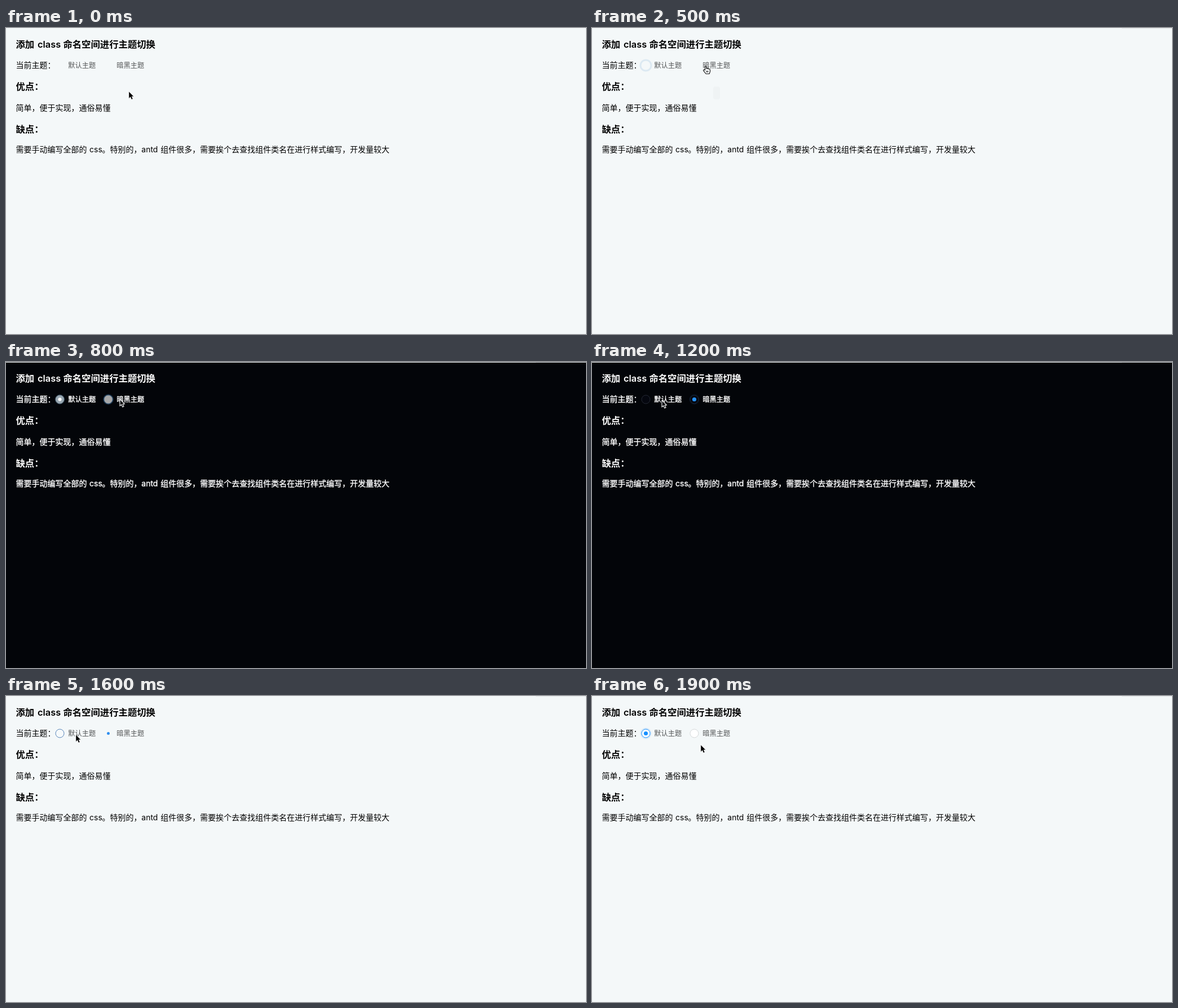
Animation of 1029x544 px, one loop 2 s. Source, as an HTML page:

```html
<!DOCTYPE html>
<html lang="zh-CN">
<head>
<meta charset="utf-8">
<title>主题切换</title>
<style>
  html, body { margin: 0; width: 100%; height: 100%; overflow: hidden; background: #f4f8f9; }
  svg { display: block; width: 1029px; height: 544px; }
  text { font: 14px 'Noto Sans CJK SC', 'Noto Sans CJK', sans-serif; fill: var(--ink); white-space: pre; }
  .h { font-size: 16.38px; font-weight: 600; }
  .label { font-size: 12.25px; fill: var(--label); }
  .latin { font-family: Inter, sans-serif; }
  #stage { --bg: #f4f8f9; --ink: #000; --label: #555758; }
  #stage.dark { --bg: #030509; --ink: #fff; --label: #fff; }
  .dark text:not(.h) { stroke: #fff; stroke-width: .35px; }
</style>
</head>
<body>
<svg id="stage" viewBox="0 0 1029 544">
  <rect width="1029" height="544" fill="#f4f8f9"/>
  <rect y="1" width="1029" height="543" fill="var(--bg)"/>
  <rect id="topLine" x="940" width="89" height="1" fill="#e2e5e7"/>
  <rect id="trail" x="215" y="104" width="12" height="23" rx="4" fill="#eff3f4"/>

  <text class="h" y="35"><tspan x="17.5">添加</tspan><tspan class="latin" x="56">class</tspan><tspan x="101.4">命名空间进行主题切换</tspan></text>
  <text x="17.5" y="71">当前主题：</text>
  <text class="h" x="17.5" y="110">优点：</text>
  <text x="17.5" y="147">简单，便于实现，通俗易懂</text>
  <text class="h" x="17.5" y="186">缺点：</text>
  <text y="221"><tspan x="17.5">需要手动编写全部的</tspan><tspan class="latin" x="148">css</tspan><tspan x="170.5">。特别的，</tspan><tspan class="latin" x="240.3">antd</tspan><tspan x="274.3">组件很多，需要挨个去查找组件类名在进行样式编写，开发量较大</tspan></text>

  <g id="radios"></g>
  <text class="label" x="110.3" y="71">默认主题</text>
  <text class="label" x="196.3" y="71">暗黑主题</text>

  <g id="ring" fill="none">
    <circle id="outer"/>
    <circle id="inner"/>
  </g>
  <g id="pointer" stroke-linejoin="round">
    <path id="arrow" d="M0 0V12.2L2.8 9.6L4.7 14L7 13L5.1 8.8H8.6Z"/>
    <path id="hand" fill="#f4f8f9" stroke="#111" stroke-width="1.1"
      d="M3 8V1.4Q4.2 -.3 5.3 1.4V5Q6.8 4 7.6 5.4Q9 4.6 9.8 6Q11.6 5.5 12 7.4V10.5L10.6 14.5H4.6L.4 9.2Q-.4 7 1.5 7ZM5.8 9V12M8 9V12"/>
  </g>
</svg>
<script>
const STEP = 100, COUNT = 20;
const $ = id => document.getElementById(id);
const NS = 'http://www.w3.org/2000/svg';

// Pointer tip at each step
const path = [
  [218, 113], [216, 104], [211, 86], [207, 73], [204, 69],
  [202, 67], [202, 66], [202, 66], [202, 66], [193, 66],
  [168, 66], [138, 67], [124, 68], [124, 68], [124, 68],
  [124, 68], [124, 69], [138, 71], [168, 80], [193, 87]
];

// Click ring: step -> radius
const rings = { 6: 20, 7: 26.7, 14: 14, 15: 19.7 };

// Radio looks: [from step, fill, border, dot radius, dot colour, halo width, halo colour]
const looks = [
  [
    [0, 'none', 'none', 0, 'none', 0, 'none'],
    [5, 'none', 'none', 0, 'none', 3, '#dce9f2'],
    [8, '#98a7b1', '#7e929f', 3, '#fff', 1, '#152433'],
    [9, '#555e67', '#4b5864', 2, '#aab', 0, 'none'],
    [10, '#1c2028', '#2b323c', 0, 'none', 0, 'none'],
    [11, '#05070f', '#262a36', 0, 'none', 0, 'none'],
    [16, '#f6fafb', '#5583b8', 0, 'none', 0, 'none'],
    [17, '#fafcfd', '#1890ff', 2, '#1890ff', 1, '#d5e8f8'],
    [18, '#fff', '#1890ff', 3.2, '#1890ff', 2, '#d5e8f8'],
    [19, '#fff', '#1890ff', 3.6, '#1890ff', 2, '#d5e8f8']
  ], [
    [0, 'none', 'none', 0, 'none', 0, 'none'],
    [8, '#a6a7a8', '#5f7f9c', 0, 'none', 1.3, '#16314b'],
    [9, '#5b6066', '#335a7d', 1.8, '#1890ff', 1.3, '#10253a'],
    [10, '#1c2129', '#1d3857', 3, '#1890ff', 1.3, '#0c1a2a'],
    [11, '#05070f', '#19283e', 3.6, '#2592fc', 1, '#091421'],
    [16, 'none', 'none', 2.5, '#2f8ff0', 0, 'none'],
    [17, '#f7fafb', '#dfe3e5', 1.5, '#6db4f5', 0, 'none'],
    [18, '#fcfdfd', '#d9dcdd', 0, 'none', 0, 'none'],
    [19, '#fff', '#d5d8d9', 0, 'none', 0, 'none']
  ]
];

function set(el, attrs) {
  for (const k in attrs) el.setAttribute(k, attrs[k]);
  return el;
}

function circle(cx) {
  return $('radios').appendChild(set(document.createElementNS(NS, 'circle'), { cx, cy: 66.5 }));
}

const radios = [95.5, 181.5].map(x => ({ halo: circle(x), box: circle(x), dot: circle(x) }));

function drawRadio({ halo, box, dot }, look) {
  const [, fill, border, r, colour, glow, glowColour] = look;
  set(halo, { r: 8 + glow / 2, fill: 'none', stroke: glowColour, 'stroke-width': glow });
  set(box, { r: 7.5, fill, stroke: border, 'stroke-width': 1 });
  set(dot, { r, fill: colour });
}

function show(el, on) {
  el.style.display = on ? '' : 'none';
}

function draw(step) {
  const dark = step >= 8 && step < 16;
  $('stage').classList.toggle('dark', dark);
  show($('topLine'), step >= 5);
  show($('trail'), step >= 1 && step < 8);

  radios.forEach((radio, i) => drawRadio(radio, looks[i].filter(l => l[0] <= step).pop()));

  const [x, y] = path[step];
  const hand = step >= 5 && step < 8;
  show($('hand'), hand);
  show($('arrow'), !hand);
  set($('pointer'), { transform: `translate(${hand ? x - 4.5 : x} ${y})` });
  set($('arrow'), { fill: dark ? '#030509' : '#000', stroke: '#fff', 'stroke-width': dark ? 1.1 : .4 });

  const r = rings[step];
  show($('ring'), r);
  if (r) {
    const c = { cx: dark ? 124 : 201.5, cy: dark ? 69 : 66.5 };
    set($('outer'), { ...c, r, stroke: dark ? '#b4b5b6' : '#000', 'stroke-width': dark ? 1 : 1.4 });
    set($('inner'), { ...c, r: r - 2, stroke: dark ? '#a4a5a6' : 'none', 'stroke-width': 1 });
  }
}

const start = performance.now();
let last = -1;
function tick() {
  const step = Math.floor((performance.now() - start) / STEP) % COUNT;
  if (step !== last) draw(last = step);
  requestAnimationFrame(tick);
}
tick();
</script>
</body>
</html>
```
